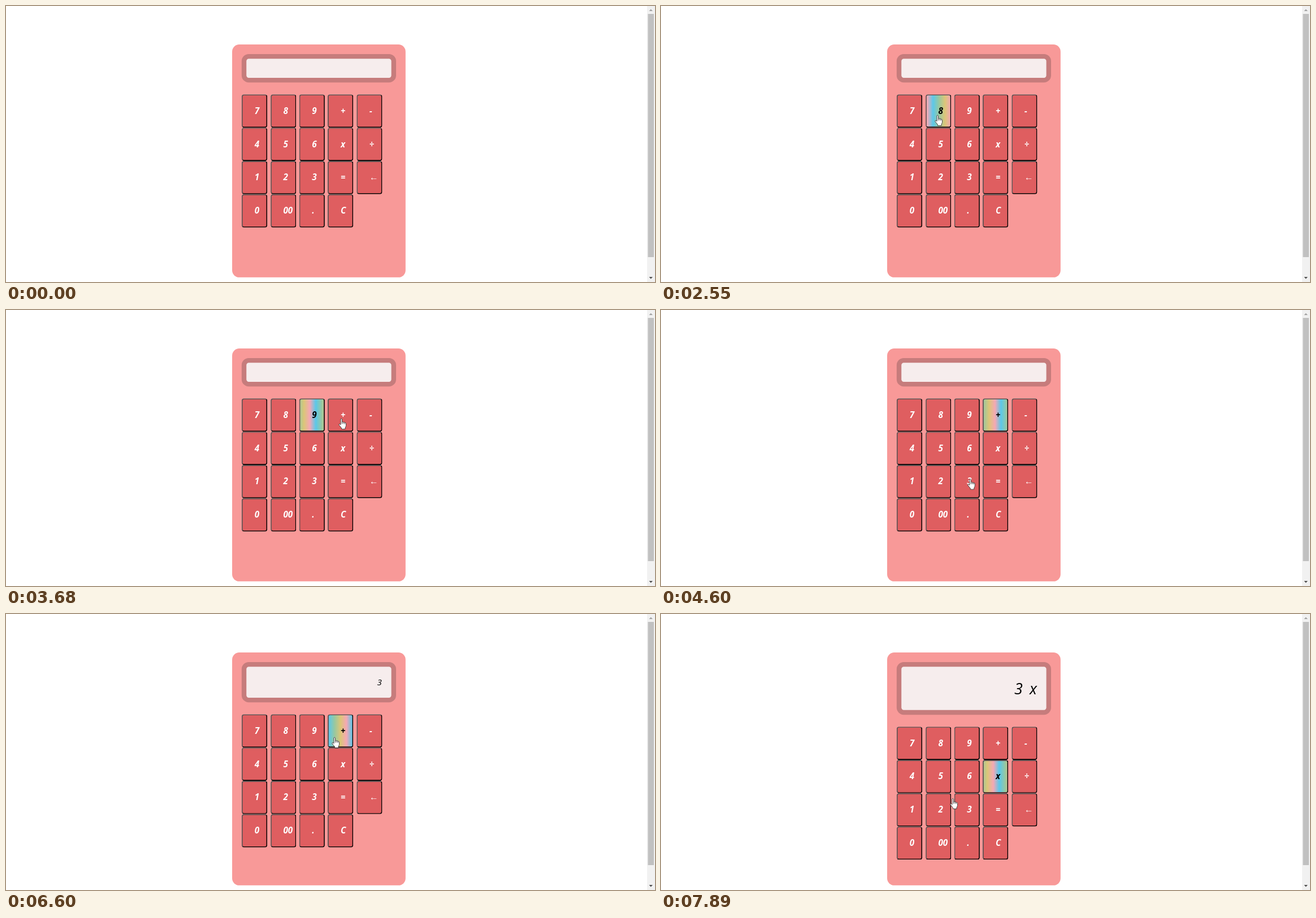
An HTML page that plays this animation: 1148 px wide and 488 px high, repeating every 8000 ms.

```html
<!DOCTYPE html>
<html lang="en">
<head>
<meta charset="utf-8">
<title>Calculator</title>
<style>
  html, body { margin: 0; width: 100%; height: 100%; overflow: hidden; background: #fff; }
  /* a 1366px wide page shown on a 1148px stage */
  #page { position: absolute; left: 0; top: 0; width: 1366px; height: 581px;
    transform: scale(calc(1148 / 1366)); transform-origin: 0 0;
    font: italic 18px "Open Sans", "Noto Sans", "Liberation Sans", sans-serif; }
  #page div { position: absolute; box-sizing: border-box; }
  #panel { left: 476px; top: 81px; width: 365px; height: 490px; border-radius: 15px; background: #f89998; }
  #screen { left: 20px; top: 20px; width: 325px; padding: 20px; border: 10px solid #c67c7c;
    border-radius: 15px; background: #f6eded; color: #000; text-align: right;
    white-space: pre; word-spacing: 6px; }
  #keys { left: 20.2px; }
  .key { width: 54px; height: 70px; padding-left: 25px; border: 2px outset #000; border-radius: 5px;
    background-color: #df5e60; color: #fff; font-weight: 700; line-height: 64px; }
  .key.arrow { font: 400 19px/66px "Liberation Sans", sans-serif; }
  .key.on { color: #000; background-image:
    linear-gradient(90deg, #5bc8ea, #98c8a0 25%, #dbc678 50%, #f5a8b4 75%, #5bc8ea); }
  .key.down { border-style: inset; }
  svg { position: absolute; left: 0; top: 0; }
</style>
</head>
<body>
<div id="page">
  <div id="panel">
    <div id="screen"></div>
    <div id="keys"></div>
  </div>
</div>
<svg width="1148" height="488">
  <rect x="1134" width="14" height="488" fill="#f1f1f1"/>
  <rect x="1135.5" y="14" width="10.5" height="430" fill="#c1c1c1"/>
  <path d="M1137.5 9l3.2-3.4 3.2 3.4z" fill="#a3a3a3"/>
  <path d="M1137.5 479l3.2 3.4 3.2-3.4z" fill="#505050"/>
  <g id="hand" stroke="#3a3434" stroke-width=".9" stroke-linejoin="round">
    <path fill="#fff" d="M4 2Q5.2 .1 6.5 2V7Q8 6 9 7.4Q10.5 6.7 11.3 8.2Q13 7.6 13.5 9.4V13.5Q13.2 15.5 12 17V19.5H5.5V17.7L1 12.2Q.7 10 2.5 10.4L4 12Z"/>
    <path fill="none" d="M6.5 7V10.4M9 7.4V10.4M11.3 8.2V10.7"/>
  </g>
  <path id="arrow" fill="#fff" stroke="#222" stroke-width=".9" d="M.6 .8V14L3.7 11.2L5.7 16.2L8 15.2L6 10.4H10.2Z"/>
</svg>
<script>
const LOOP = 8000, SPIN = 1000, INNER = 50;
const LAG = 200, GLIDE = 250, GAP = 150, PRESS = 270;
const $ = id => document.getElementById(id);

// pointer stops: when the key lights up, the key, and the pointer position
const stops = [
  { at: 950, key: '', x: 424, y: 108 },
  { at: 1350, key: '7', x: 445, y: 193 },
  { at: 2280, key: '8', x: 484, y: 192 },
  { at: 3021, key: '9', x: 535, y: 194 },
  { at: 3870, key: '+', x: 588, y: 191 },
  { at: 4837, key: '3', x: 539, y: 304 },
  { at: 6260, key: 'x', x: 600, y: 262 },
  { at: 6600, key: '+', x: 576, y: 217 },
  { at: 7231, key: 'x', x: 582, y: 263 },
  { at: 8090, key: '', x: 511, y: 325 },
];

const screens = [
  { at: 0, text: '', size: 18, line: 0 },
  { at: 5790, text: '3', size: 18, line: 25 },
  { at: 7350, text: '3 x', size: 32, line: 51 },
];

const keys = {};
['7 8 9 + -', '4 5 6 x ÷', '1 2 3 = ←', '0 00 . C'].forEach((row, r) =>
  row.split(' ').forEach((label, c) => {
    const el = keys[label] = document.createElement('div');
    el.className = label === '←' ? 'key arrow' : 'key';
    el.textContent = label;
    el.style.left = 60.4 * c + 'px';
    el.style.top = 70 * r + 'px';
    $('keys').append(el);
  }));

const lastIndex = (list, t) => Math.max(0, list.filter(e => e.at <= t).length - 1);
const smooth = k => k * k * (3 - 2 * k);

function pointer(t) {
  const i = lastIndex(stops, t + LAG + GLIDE);
  const to = stops[i], from = stops[i - 1] || to;
  const k = smooth(Math.min(1, Math.max(0, (t + LAG + GLIDE - to.at) / GLIDE)));
  return { x: from.x + (to.x - from.x) * k, y: from.y + (to.y - from.y) * k };
}

function place(el, shown, { x, y }) {
  el.setAttribute('visibility', shown ? 'visible' : 'hidden');
  el.setAttribute('transform', `translate(${x} ${y})`);
}

function drawScreen({ text, size, line }) {
  const el = $('screen');
  el.textContent = text;
  el.style.fontSize = size + 'px';
  el.style.lineHeight = line + 'px';
  el.style.height = 60 + line + 'px';
  $('keys').style.top = 105 + line + 'px';
}

function drawKeys(t) {
  const i = lastIndex(stops, t), { at, key } = stops[i];
  const leaving = stops[i + 1] && t >= stops[i + 1].at - GAP;
  const down = screens.some(s => t < s.at && t >= s.at - PRESS);
  for (const [label, el] of Object.entries(keys)) {
    const on = label === key && !leaving && t >= at;
    el.classList.toggle('on', on);
    el.classList.toggle('down', on && down);
    if (on) el.style.backgroundPosition = (t - at) / SPIN * INNER + 'px 0';
  }
}

function draw(t) {
  drawScreen(screens[lastIndex(screens, t)]);
  drawKeys(t);
  const p = pointer(t), onKeys = p.y > 150;
  place($('hand'), onKeys, p);
  place($('arrow'), !onKeys && t >= stops[0].at - LAG, p);
}

const begin = performance.now();
function frame() {
  draw((performance.now() - begin) % LOOP);
  requestAnimationFrame(frame);
}
draw(0);
requestAnimationFrame(frame);
</script>
</body>
</html>
```
